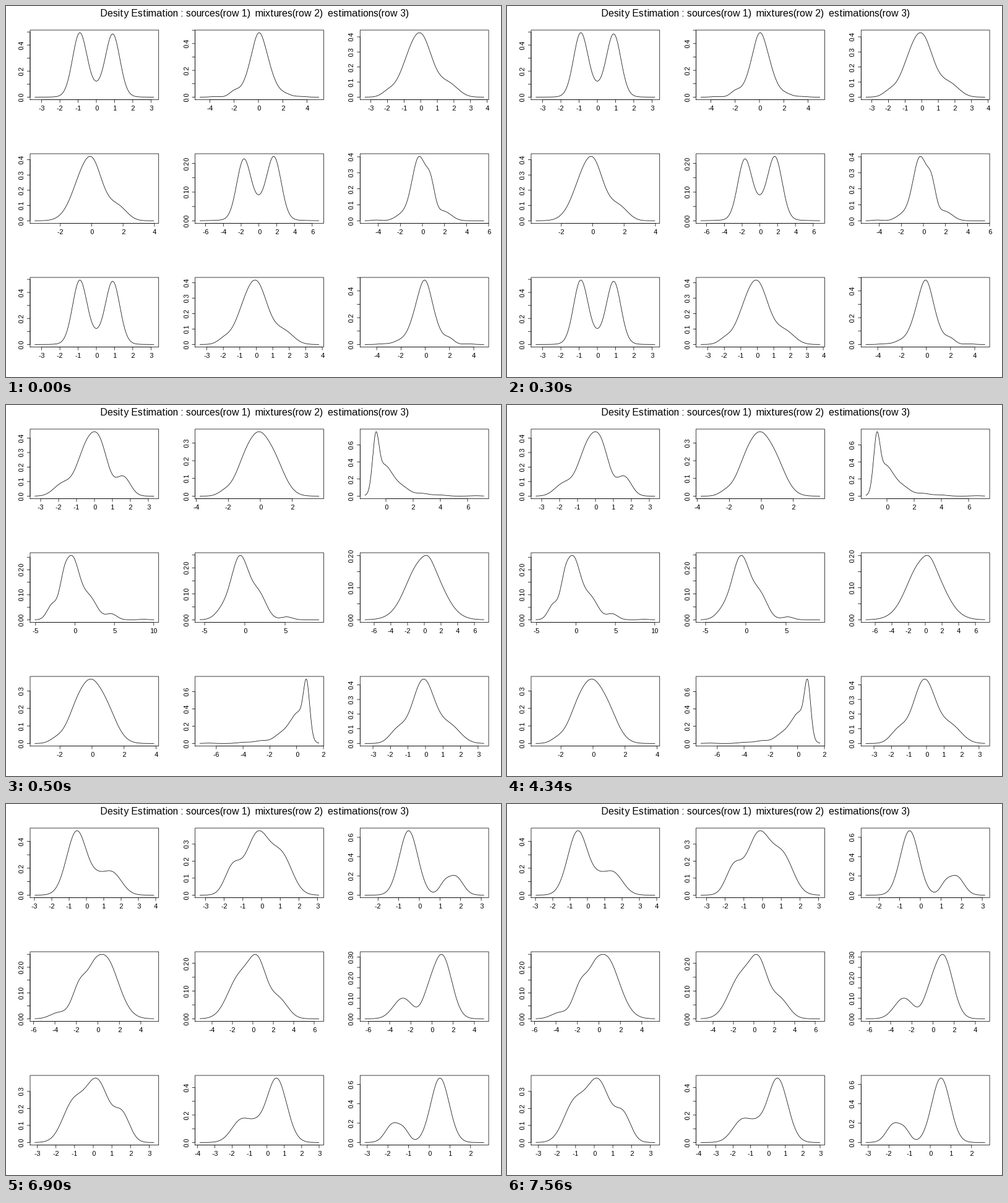
Write a matplotlib script that moves like this. It is 800 px wide and 600 px high and loops after 8 s.

```python
import math

import numpy as np
import matplotlib.pyplot as plt
from matplotlib.animation import FuncAnimation

W, H, DPI = 800, 600, 100
PX = 72 / DPI
LINE = 0.75 * PX
CELL_W, CELL_H = W / 3, H / 3
LEFT, RIGHT, TOP, BOTTOM = 38.97, 246.71, 38.97, 151.53
TICK = 4.75
PAD_X = (RIGHT - LEFT) * 0.04 / 1.08
PAD_Y = (BOTTOM - TOP) * 0.04 / 1.08
PEAK = BOTTOM - TOP - 2 * PAD_Y

STEP_MS = 100
FRAMES = 80
CHANGES = (5, 69)

plt.rcParams["font.family"] = "Liberation Sans"
plt.rcParams["text.hinting_factor"] = 1  # whole-pixel letter spacing
fig = plt.figure(figsize=(W / DPI, H / DPI), dpi=DPI, facecolor="white")
ax = fig.add_axes([0, 0, 1, 1])
ax.set_xlim(0, W)
ax.set_ylim(H, 0)
ax.axis("off")

scenes = [[], [], []]


def stroke(xs, ys):
    return ax.plot(xs, ys, color="black", lw=LINE, snap=False,
                   solid_capstyle="round", solid_joinstyle="round")[0]


def label(x, y, text, size=10.56, rotation=0):
    return ax.text(x, y, text, fontsize=size * PX, color="black", ha="center",
                   va="baseline", rotation=rotation, rotation_mode="anchor")


def density(u, bumps):
    """Sum of bells (height, mean, spread), scaled to a peak of one."""
    y = sum(a * np.exp(-0.5 * ((u - m) / s) ** 2) for a, m, s in bumps)
    return y / y.max()


def mirror(bumps):
    return [(a, -m, s) for a, m, s in bumps]


def x_step(span):
    return 1 if span < 7.9 else 2 if span < 15.7 else 5


def y_step(top):
    return 0.05 if top < 0.32 else 0.1 if top < 0.5 else 0.2


def panel(scene, row, col, zero, unit, top, bumps):
    """One plot; zero and unit place the x axis in pixels, top is the peak."""
    out = scenes[scene]
    ox, oy = col * CELL_W, row * CELL_H
    left, right = ox + LEFT, ox + RIGHT
    upper, lower = oy + TOP, oy + BOTTOM
    base = lower - PAD_Y

    xs = np.linspace(left + PAD_X, right - PAD_X, 400)
    out.append(stroke(xs, base - PEAK * density((xs - zero) / unit, bumps)))
    out.append(stroke([left, right, right, left, left],
                      [lower, lower, upper, upper, lower]))

    dx = x_step((right - left) / unit)
    first = math.ceil((left - zero) / unit / dx)
    last = math.floor((right - zero) / unit / dx + 0.005)
    ticks = [zero + i * dx * unit for i in range(first, last + 1)]
    out.append(stroke([ticks[0], ticks[-1]], [lower, lower]))
    for i, x in enumerate(ticks, first):
        out.append(stroke([x, x], [lower, lower + TICK]))
        out.append(label(x, oy + 169, str(i * dx)))

    dy = y_step(top)
    gap = dy * PEAK / top
    every = 2 if dy < 0.1 or gap < 23 else 1
    digits = 2 if dy < 0.1 else 1
    ticks = np.arange(base, upper - 0.1, -gap)
    out.append(stroke([left, left], [ticks[0], ticks[-1]]))
    for i, y in enumerate(ticks):
        out.append(stroke([left - TICK, left], [y, y]))
        if i % every == 0:
            out.append(label(ox + 28, y, f"{i * dy:.{digits}f}", rotation=90))


def first_scene():
    twin = [(.92, -.92, .385), (.9, .91, .385), (.14, 0, .85)]
    sharp = [(.15, 0, .4), (.85, .1, .82), (.08, -2, .4), (.04, 2.2, .5),
             (.01, -3.5, .4), (.01, 3.5, .4)]
    skew = [(.97, -.15, .8), (.06, -2, .35), (.18, 1.75, .55), (.08, .2, .4)]
    panel(0, 0, 0, 146, 29.45, .495, twin)
    panel(0, 0, 1, 408, 19.65, .4815, sharp)
    panel(0, 0, 2, 670.2, 26.85, .428, skew)
    panel(0, 1, 0, 138.5, 25.35, .422,
          [(.93, -.2, .85), (.18, 1.75, .55), (.09, .15, .4)])
    panel(0, 1, 1, 408.7, 14.35, .2247,
          [(.93, -1.72, .78), (.97, 1.72, .8), (.2, 0, .9), (.04, 0, 2.6)])
    panel(0, 1, 2, 673, 17.83, .403,
          [(1, -.3, .65), (.42, .75, .38), (.15, 1.9, .7), (.09, -1.9, .6),
           (.012, -4.2, .4)])
    panel(0, 2, 0, 146, 29.45, .495, twin)
    panel(0, 2, 1, 404.5, 26.65, .417, skew)
    panel(0, 2, 2, 677.6, 19.6, .4815, mirror(sharp))


def second_scene():
    flat = [(.66, -.75, .68), (.7, .62, .75), (.17, -.05, .45), (.06, -2.25, .4)]
    spike = [(.75, -.75, .23), (.42, -.2, .5), (.17, .6, .5), (.09, 1.4, .45),
             (.042, 2.6, .5), (.018, 3.9, .5), (.006, 6.6, .4)]
    panel(1, 0, 0, 143, 29, .444,
          [(.77, -.42, .55), (.62, .35, .45), (.19, -1.8, .48), (.31, 1.6, .4)])
    panel(1, 0, 1, 411, 25.85, .364, flat)
    panel(1, 0, 2, 614, 22, .754, spike)
    panel(1, 1, 0, 111.5, 12.73, .2576,
          [(.95, -.4, .95), (.33, 1.85, .95), (.25, -1.5, .5), (.22, -2.9, .65),
           (.09, 4.6, .7), (.008, 8.7, .5)])
    panel(1, 1, 1, 386, 13, .248,
          [(.97, -.6, 1.08), (.37, 1.75, .95), (.13, -2.8, .9), (.045, 5.2, .7)])
    panel(1, 1, 2, 676, 13.5, .201,
          [(.93, .05, 2), (.08, .5, .6), (.05, -1.5, 1)])
    panel(1, 2, 0, 139, 25.9, .368, flat)
    panel(1, 2, 1, 469.7, 21.65, .745, mirror(spike))
    panel(1, 2, 2, 678, 28.3, .439,
          [(1, -.12, .63), (.2, -1.6, .45), (.27, 1.4, .6)])


def third_scene():
    ledge = [(.98, -.55, .58), (.35, 1.45, .57), (.13, .6, .4)]
    steps = [(.4, -1.55, .42), (.93, -.2, .62), (.56, 1.1, .56)]
    split = [(1, -.52, .445), (.14, 1.2, .25), (.29, 1.75, .36)]
    panel(2, 0, 0, 130, 28, .479, ledge)
    panel(2, 0, 1, 413, 30.2, .379, steps)
    panel(2, 0, 2, 668, 33.35, .669, split)
    panel(2, 1, 0, 148.5, 17.35, .25,
          [(.95, .6, 1.25), (.42, -1.7, .7), (.12, -.4, .5), (.09, -3.7, .75)])
    panel(2, 1, 1, 399, 16.5, .2323,
          [(.66, -1.3, 1.15), (.77, .5, .85), (.31, 2.5, .9)])
    panel(2, 1, 2, 688.5, 17.1, .313,
          [(.98, .95, .9), (.32, -2.75, .9), (.2, -.4, .6)])
    panel(2, 2, 0, 141, 30.15, .379, mirror(steps))
    panel(2, 2, 1, 421.7, 28.1, .47, mirror(ledge))
    panel(2, 2, 2, 684, 33.4, .666, mirror(split))


first_scene()
second_scene()
third_scene()
label(402, 17, "Desity Estimation : sources(row 1)  mixtures(row 2)"
      "  estimations(row 3)", size=16)


def draw(frame):
    current = sum(frame >= c for c in CHANGES)
    for i, artists in enumerate(scenes):
        for artist in artists:
            artist.set_visible(i == current)
    return []


anim = FuncAnimation(fig, draw, frames=FRAMES, init_func=lambda: draw(0),
                     interval=STEP_MS, repeat=True, repeat_delay=0, blit=False)
plt.show()
```
